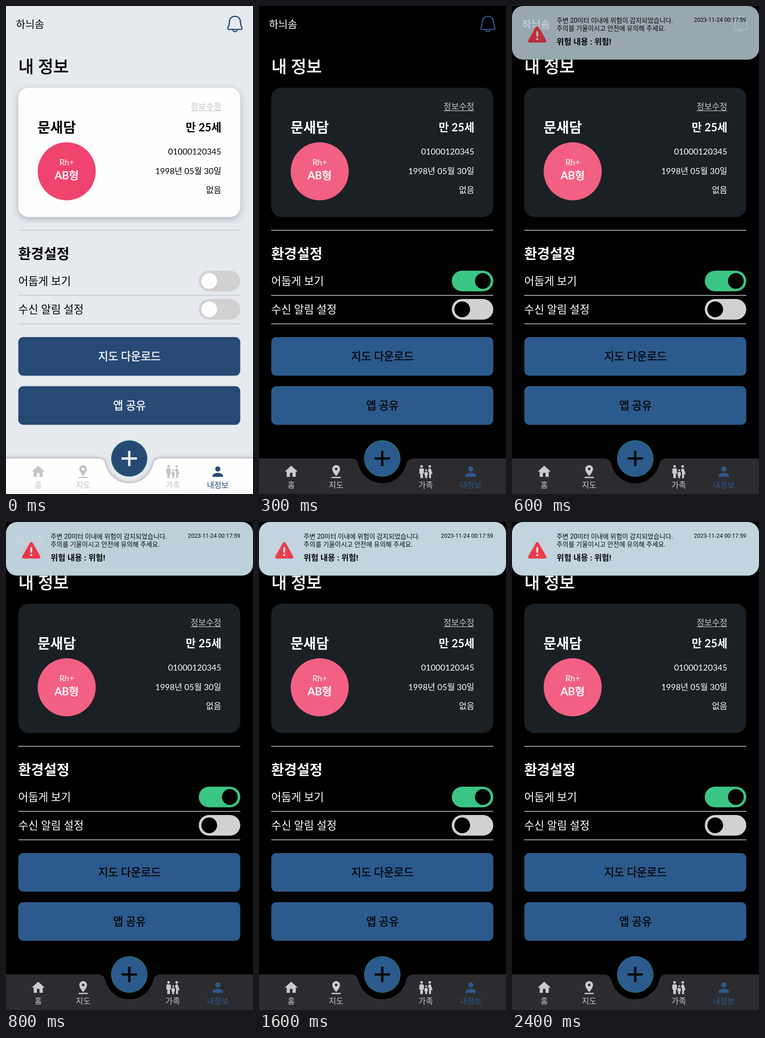
Recreate the animation shown at these times as an HTML page with a canvas. Size 533 by 1051 pixels, loop 2500 ms.

```html
<!DOCTYPE html>
<html lang="ko">
<head>
<meta charset="utf-8">
<title>내 정보</title>
<style>
  html, body { margin: 0; width: 100%; height: 100%; overflow: hidden; background: #000; }
  canvas { position: absolute; left: 0; top: 0; width: 533px; height: 1051px; }
</style>
</head>
<body>
<canvas id="page"></canvas>
<canvas id="alert"></canvas>
<script>
const W = 533, H = 1051, LOOP = 2500, STEP = 100;
const APP_FONT = 'Lato, "Noto Sans CJK KR", sans-serif';
const ALERT_FONT = 'Roboto, "Noto Sans CJK KR", sans-serif';

const LIGHT = {
  bg: '#e6e9ee', text: '#050505', card: '#fefefe', edit: '#c6c6c8', line: '#c4c7cb',
  blood: '#f0436e', green: '#34b07b', knob: '#fefefe', button: '#274a75', onButton: '#f4f6f8',
  bar: '#fefefe', tab: '#c4c5c8', active: '#274a75', bell: '#274a75', shadow: true
};
const DARK = {
  bg: '#000', text: '#fefefe', card: '#1b2025', edit: '#c8c8ca', line: '#d2d2d3',
  blood: '#f26083', green: '#3bc584', knob: '#000', button: '#2c5a8c', onButton: '#07090c',
  bar: '#2c2b2f', tab: '#cbcacd', active: '#2c5a8c', bell: '#285283', shadow: false
};

const BELL = new Path2D(
  'M494 22.3c-7.5 0-12 5.6-12 12.5 0 6-1.4 8.5-3 11.8-.9 2 .2 3.9 2.2 3.9h25.6' +
  'c2 0 3.1-1.9 2.2-3.9-1.6-3.3-3-5.8-3-11.8 0-6.9-4.5-12.5-12-12.5z' +
  'M489.5 51c0 2.5 2 4.3 4.5 4.3s4.5-1.8 4.5-4.3');
const BAR = new Path2D(
  'M-20 974.5H198Q212 974.5 214.6 988A53 53 0 0 0 317.4 988Q320 974.5 334 974.5H553V1080H-20Z');

// Tab icons on a 24 unit grid
const HOME = new Path2D('M10 20v-6h4v6h5v-8h3L12 3 2 12h3v8z');
const PIN = new Path2D(
  'M18 8c0-3.3-2.7-6-6-6S6 4.7 6 8c0 4.5 6 11 6 11s6-6.5 6-11z' +
  'M10 8a2 2 0 1 1 4 0a2 2 0 1 1-4 0zM5 20v2h14v-2z');
const FAMILY = new Path2D(
  'M20 22v-6h2.5L19.96 8.4A2 2 0 0 0 18 7a2 2 0 0 0-1.96 1.4l-.86 2.55A3.5 3.5 0 0 1 17 14v8z' +
  'M7.5 22v-7H9V9a2 2 0 0 0-2-2H4a2 2 0 0 0-2 2v6h1.5v7z' +
  'M14 22v-4h1v-4a1.5 1.5 0 0 0-1.5-1.5h-2A1.5 1.5 0 0 0 10 14v4h1v4z');
for (const [x, y, r] of [[18, 4, 2], [5.5, 4, 2], [12.5, 10, 1.5]]) {
  FAMILY.moveTo(x + r, y);
  FAMILY.arc(x, y, r, 0, 7);
}
const PERSON = new Path2D(
  'M12 12a4 4 0 1 0 0-8a4 4 0 1 0 0 8zM12 14c-2.67 0-8 1.34-8 4v2h16v-2c0-2.66-5.33-4-8-4z');
const TABS = [[69.5, '홈', HOME], [166.5, '지도', PIN], [360, '가족', FAMILY], [457, '내정보', PERSON]];

function setup(id) {
  const el = document.getElementById(id), dpr = window.devicePixelRatio || 1;
  el.width = Math.round(W * dpr);
  el.height = Math.round(H * dpr);
  const c = el.getContext('2d');
  c.scale(dpr, dpr);
  return c;
}
const page = setup('page');
const notice = setup('alert');

function text(c, str, x, y, size, color, { align = 'left', weight = 400, extra = 0, font = APP_FONT } = {}) {
  c.font = `${weight} ${size}px ${font}`;
  c.textAlign = align;
  c.fillStyle = color;
  c.fillText(str, x, y);
  if (extra) {
    c.strokeStyle = color;
    c.lineWidth = size * extra;
    c.lineJoin = 'round';
    c.strokeText(str, x, y);
  }
}

function box(c, x, y, w, h, r, color) {
  c.fillStyle = color;
  c.beginPath();
  c.roundRect(x, y, w, h, r);
  c.fill();
}

function disc(c, x, y, r, color) {
  c.fillStyle = color;
  c.beginPath();
  c.arc(x, y, r, 0, Math.PI * 2);
  c.fill();
}

function withShadow(c, on, blur, dy, color, draw) {
  c.save();
  if (on) {
    c.shadowColor = color;
    c.shadowBlur = blur;
    c.shadowOffsetY = dy;
  }
  draw();
  c.restore();
}

function toggle(c, y, on, right, th) {
  box(c, 416, y, 89.5, 44.5, 22.2, on ? th.green : '#d2d0d1');
  disc(c, right ? 483 : 438.5, y + 22.2, 17, th.knob);
}

function drawCard(c, th) {
  const right = { align: 'right' }, mid = { align: 'center' };
  withShadow(c, th.shadow, 14, 4, 'rgba(40,50,65,.3)', () => box(c, 26.5, 176, 479, 278.5, 22, th.card));
  text(c, '정보수정', 464.5, 222.5, 18, th.edit, right);
  c.fillStyle = th.edit;
  c.fillRect(398.5, 225, 65.5, 1.2);
  text(c, '문새담', 68, 272, 30, th.text, { weight: 700 });
  text(c, '만 25세', 465, 269.8, 23.8, th.text, { align: 'right', weight: 700 });
  text(c, '01000120345', 464.5, 320.3, 18, th.text, right);
  text(c, '1998년 05월 30일', 464.5, 361.8, 18, th.text, right);
  text(c, '없음', 464.5, 403.3, 18, th.text, right);
  disc(c, 131, 356, 62.6, th.blood);
  text(c, 'Rh+', 131, 343.3, 18, '#fefefe', mid);
  text(c, 'AB형', 131, 373, 23.2, '#fefefe', { align: 'center', extra: 0.03 });
}

function drawTabs(c, th) {
  withShadow(c, th.shadow, 9, 0, 'rgba(30,35,45,.42)', () => {
    c.fillStyle = th.bar;
    c.fill(BAR);
  });
  TABS.forEach(([x, label, icon], i) => {
    const color = i === 3 ? th.active : th.tab;
    c.save();
    c.translate(x - 16.8, 985.9);
    c.scale(1.4, 1.4);
    c.fillStyle = color;
    c.fill(icon, icon === PIN ? 'evenodd' : 'nonzero');
    c.restore();
    text(c, label, x, 1038.3, 17, color, { align: 'center' });
  });
  disc(c, 266, 974.5, 39.2, '#23907f');
  disc(c, 266, 974.5, 38.3, th.button);
  c.fillStyle = th.onButton;
  c.fillRect(249.5, 972, 33, 5);
  c.fillRect(263.5, 958, 5, 33);
}

function drawPage(t) {
  const c = page, dark = t >= 300, th = dark ? DARK : LIGHT;
  c.fillStyle = th.bg;
  c.fillRect(0, 0, W, H);

  text(c, '하늬솜', 21.5, 47.3, 22, th.text);
  c.strokeStyle = th.bell;
  c.lineWidth = 2.6;
  c.lineCap = 'round';
  c.stroke(BELL);
  text(c, '내 정보', 26.8, 143.5, 36, th.text, { extra: 0.026 });

  drawCard(c, th);

  c.fillStyle = th.line;
  for (const y of [482.3, 622.5, 683.7]) c.fillRect(26.5, y, 479, 1.5);
  text(c, '환경설정', 26.5, 544, 30, th.text, { weight: 700 });
  text(c, '어둡게 보기', 26.5, 601.2, 23.4, th.text);
  text(c, '수신 알림 설정', 26.5, 662.2, 23.4, th.text);
  toggle(c, 570, t >= 200, dark, th);
  toggle(c, 631, false, false, th);

  if (t >= 100 && t < 300) {
    disc(c, 467.5, 600, 16, 'rgba(170,178,180,.55)');
    disc(c, 467.5, 600, 13, 'rgba(170,178,180,.15)');
  }

  for (const [y, label] of [[713, '지도 다운로드'], [818.7, '앱 공유']]) {
    box(c, 26.5, y, 479, 83.3, 11, th.button);
    text(c, label, 266.5, y + 49.8, 23.4, th.onButton, { align: 'center', extra: 0.026 });
  }
  drawTabs(c, th);
}

function drawAlert() {
  const c = notice, ink = '#080a0c', opt = { font: ALERT_FONT };
  c.clearRect(0, 0, W, H);
  box(c, 0, 0, W, 115.5, 24, '#c2d5de');

  c.fillStyle = c.strokeStyle = '#ec3b4c';
  c.lineWidth = 7;
  c.lineJoin = c.lineCap = 'round';
  c.beginPath();
  c.moveTo(54.5, 46.8);
  c.lineTo(70.6, 75.2);
  c.lineTo(38.4, 75.2);
  c.closePath();
  c.fill();
  c.stroke();
  c.strokeStyle = '#f1e6ea';
  c.lineWidth = 4;
  c.beginPath();
  c.moveTo(54.5, 56);
  c.lineTo(54.5, 64.5);
  c.stroke();
  disc(c, 54.5, 71.3, 2.4, '#f1e6ea');

  text(c, '주변 20미터 이내에 위험이 감지되었습니다.', 96.3, 36.2, 13.95, ink, opt);
  text(c, '주의를 기울이시고 안전에 유의해 주세요.', 96.3, 53.1, 13.95, ink, opt);
  text(c, '위험 내용 : 위험!', 96.3, 83.2, 17.3, ink, { ...opt, weight: 700 });
  text(c, '2023-11-24 00:17:59', 505.5, 34.3, 12.35, ink, { ...opt, align: 'right' });
}

const FADE = [[380, 0], [500, 0.46], [620, 0.86], [800, 0.98], [1200, 1]];
function fade(t) {
  if (t <= FADE[0][0]) return 0;
  for (let i = 1; i < FADE.length; i++) {
    const [t0, a] = FADE[i - 1], [t1, b] = FADE[i];
    if (t <= t1) return a + (b - a) * (t - t0) / (t1 - t0);
  }
  return 1;
}

const start = performance.now();
function tick() {
  const ms = Math.max(0, performance.now() - start) % LOOP;
  const t = Math.floor(ms / STEP) * STEP;
  drawPage(t);
  drawAlert();
  notice.canvas.style.opacity = fade(t);
  requestAnimationFrame(tick);
}
tick();
</script>
</body>
</html>
```
